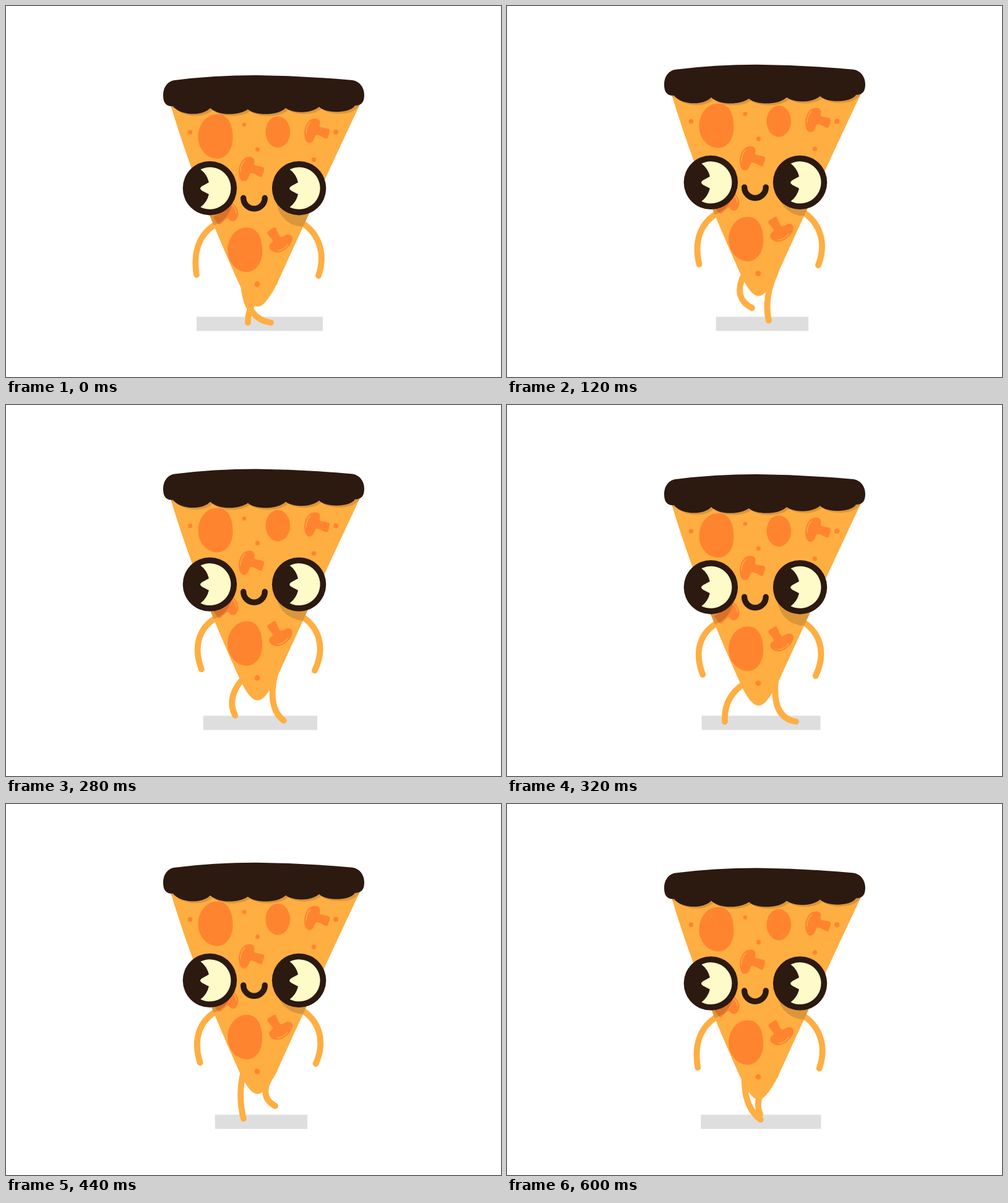
An HTML page for the animation above (0.64 s loop, 800x600 px).

```html
<!DOCTYPE html>
<html lang="en">
<head>
<meta charset="utf-8">
<title>Walking pizza</title>
<style>
  html, body { margin: 0; width: 100%; height: 100%; overflow: hidden; background: #fff; }
  svg { display: block; width: 100%; height: 100%; }
  .limb { fill: none; stroke: #ffae42; stroke-width: 9.8; stroke-linecap: round; }
  .topping { fill: #ff842f; }
  .dark { fill: #2c1910; }
  .shade { fill: #000; opacity: .14; }
</style>
</head>
<body>
<svg viewBox="0 0 800 600">
  <defs>
    <path id="slice" d="M264.5 155 Q302.5 285 376.5 449 Q393 485 405 486 Q412 487 419 479 Q430 466 438.5 448 Q509 293 572.5 158 Z"/>
    <clipPath id="sliceClip"><use href="#slice"/></clipPath>
    <path id="crust" d="M270 162 C257 163 254 154 254 144 C254 131 262 121 273 120 Q335 112 404 112 Q482 113 560 120
      C572 122 579 132 579 144 C579 156 574 161 564 161 C556 174 517 174.5 506 163 C494 174 465 174.5 452 165
      C440 177.5 402 178 391 167 C377 177.5 343 178 330 165 C318 178.5 282 178 270 162 Z"/>
    <path id="pepperoni" d="M343 175 C361 176 367 195 366.5 216 C365 236 354 247 341 247 C322 246 310 228 310.5 211 C311 190 325 174 343 175 Z"/>
    <g id="mushroom">
      <path class="topping" d="M-2 -19 C4 -19 7 -14 5 -9 Q4 -6 7 -5 L19 -2.5 Q22 -1.5 21 3 L18 12 Q17 14.5 14 13 L5 8.5 Q0 6.5 -2 9 L-5 16 Q-8 21 -14 20 Q-20 16 -20 4 C-19 -10 -12 -19.5 -2 -19 Z"/>
      <path d="M-17 5 Q-17 -7 -10 -13" fill="none" stroke="#ffae42" stroke-width="1.4" stroke-linecap="round"/>
    </g>
    <g id="eye">
      <circle class="dark" r="43.7"/>
      <path fill="#fffbc9" d="M-15 -30.5 A34 34 0 1 1 -15 30.5 A36.5 36.5 0 0 0 -1.5 9.7 L-12.5 4 Q-18.5 .3 -12.5 -3.5 L-1.5 -9.5 A36.5 36.5 0 0 0 -15 -30.5 Z"/>
    </g>
  </defs>

  <rect id="ground" y="502.5" height="23" fill="#dedede"/>
  <path id="leftLeg" class="limb"/>
  <path id="rightLeg" class="limb"/>

  <g id="body">
    <path id="leftArm" class="limb"/>
    <path id="rightArm" class="limb"/>
    <use href="#slice" fill="#ffae42"/>
    <g clip-path="url(#sliceClip)">
      <g class="topping">
        <use href="#pepperoni"/>
        <use href="#pepperoni" x="47.7" y="183.3"/>
        <ellipse cx="439.3" cy="203.7" rx="19.8" ry="25.3"/>
        <circle cx="297.5" cy="204" r="3.8"/>
        <circle cx="385" cy="192" r="3.3"/>
        <circle cx="406.5" cy="232" r="3.6"/>
        <circle cx="533.3" cy="204" r="4.1"/>
        <circle cx="497.5" cy="248.5" r="3.7"/>
        <circle cx="406" cy="450" r="4.4"/>
      </g>
      <use href="#mushroom" transform="translate(502 201)"/>
      <use href="#mushroom" transform="translate(396 263)"/>
      <use href="#mushroom" transform="translate(439 379) rotate(-140)"/>
      <use href="#mushroom" transform="translate(356 335.5) rotate(125)"/>
      <circle class="shade" cx="322" cy="313.5" r="43.7"/>
      <circle class="shade" cx="481" cy="313.5" r="43.7"/>
      <use href="#crust" class="shade" x="4" y="3"/>
    </g>
    <use href="#crust" class="dark"/>
    <path d="M383.7 310.5 A17.3 17.3 0 0 0 418.3 310.5" fill="none" stroke="#2c1910" stroke-width="9.4" stroke-linecap="round"/>
  </g>

  <g id="eyes">
    <use href="#eye" x="329.4" y="294.7"/>
    <use href="#eye" x="473.6" y="294.7"/>
  </g>
</svg>
<script>
const STEP = 40, STEPS = 16;
const part = id => document.getElementById(id);
const mix = (a, b, t) => a + (b - a) * t;
const smooth = x => x * x * (3 - 2 * x);
const upDown = x => 1 - Math.abs(1 - 2 * x);
const moveUp = (id, y) => part(id).setAttribute('transform', `translate(0 ${-y})`);

// The first half of a leg's cycle swings the foot forward, the second half plants it.
function drawLeg(id, hipX, hipY, cycle, stride, bend) {
  const angle = cycle * 2 * Math.PI;
  const swing = Math.sin(angle);
  const reach = 1 - 2 * upDown(cycle);
  const footX = stride + 38 * reach * Math.abs(reach) + 4 * swing;
  const footY = 508.5 + 3.5 * reach ** 2 - 22 * Math.max(0, swing);
  const kneeX = (hipX + footX) / 2 - bend - 9 * swing;
  const kneeY = 472 + 34 * Math.max(0, Math.cos(angle)) ** 8;
  part(id).setAttribute('d', `M${hipX} ${hipY} Q${kneeX} ${kneeY} ${footX} ${footY}`);
}

function drawArm(id, curve, handX, handY) {
  part(id).setAttribute('d', `${curve} ${handX} ${handY}`);
}

function draw(step) {
  const cycle = step / STEPS;
  const hop = upDown(cycle * 2 % 1);
  const lift = 18.2 * (1 - (1 - hop) ** 2.2);
  moveUp('body', lift);
  moveUp('eyes', lift * .54);

  // The last landing of the loop spreads the shadow a little wider.
  const lastLanding = step === 0 || cycle > .75;
  const width = mix(lastLanding ? 204 : 192, 141.5, smooth(hop));
  const center = 412.5 - (width - 149) * .045;
  part('ground').setAttribute('x', center - width / 2);
  part('ground').setAttribute('width', width);

  drawLeg('leftLeg', 384, 450 - lift, cycle, 390, 18);
  drawLeg('rightLeg', 434, 447.5 - lift, (cycle + .5) % 1, 429, 22);

  const sway = smooth(upDown(cycle));
  drawArm('leftArm', 'M342 351 C310.5 368.5 302.5 400', 308 + 8.3 * sway, 434.7 + 1.3 * sway);
  drawArm('rightArm', 'M474 348 C504 364.5 518 398', 505 - 6.3 * sway, 436 + 2 * sway);
}

const origin = performance.now();
function tick(now) {
  draw(Math.floor(Math.max(0, now - origin) / STEP) % STEPS);
  requestAnimationFrame(tick);
}
draw(0);
requestAnimationFrame(tick);
</script>
</body>
</html>
```
